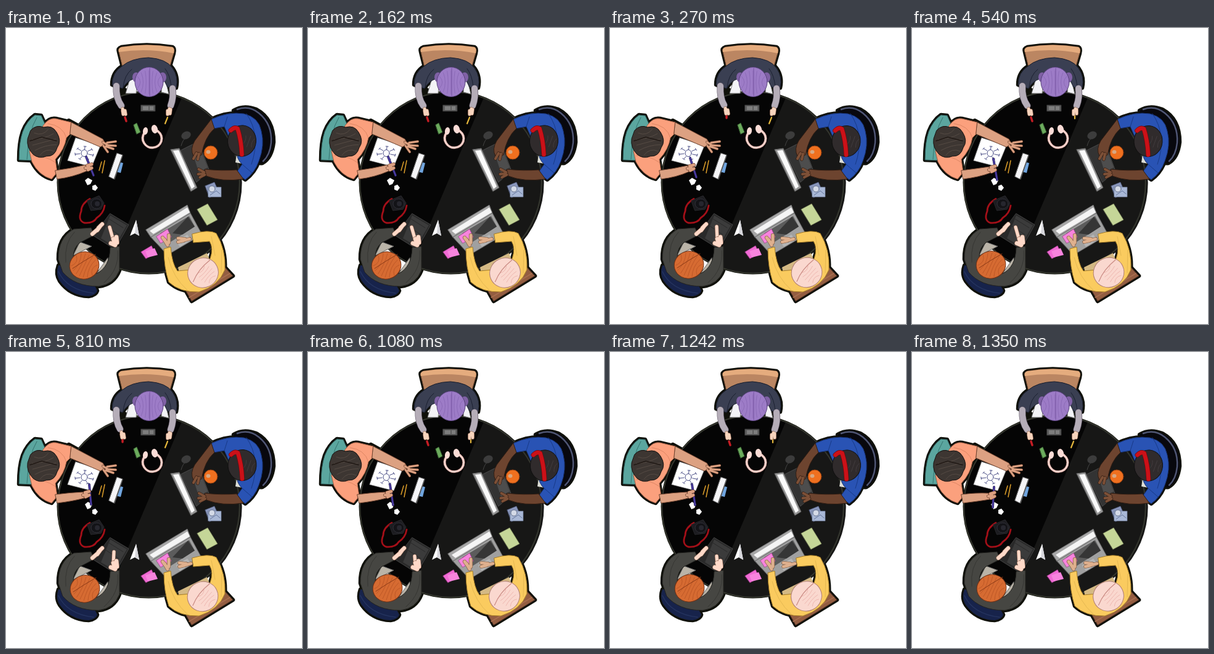
Write an HTML page that moves like this. It is 480 px wide and 480 px high and loops after 1620 ms.

```html
<!DOCTYPE html>
<html lang="en">
<head>
<meta charset="utf-8">
<title>Round table meeting</title>
<style>
html, body { margin: 0; width: 100%; height: 100%; overflow: hidden; background: #fff; }
svg { display: block; width: 100vw; height: 100vh; }
</style>
</head>
<body>
<svg id="stage" viewBox="0 0 480 480" stroke-linecap="round" stroke-linejoin="round"></svg>
<script>
const stage = document.getElementById('stage');
const INK = '#10110a';

const shape = (d, fill, line = 'none', w = 1) =>
  `<path d="${d}" fill="${fill}" stroke="${line}" stroke-width="${w}"/>`;
const line = (d, color, w = 1) => shape(d, 'none', color, w);
const oval = (x, y, rx, ry, fill, turn = 0, edge = 'none') =>
  `<ellipse cx="${x}" cy="${y}" rx="${rx}" ry="${ry}" fill="${fill}" stroke="${edge}" transform="rotate(${turn} ${x} ${y})"/>`;
const limb = (d, color, w, edge) => line(d, edge, w + 1.2) + line(d, color, w);
const moved = ([x, y], content) => `<g transform="translate(${x} ${y})">${content}</g>`;

const chair = {
  top: 'M183 39Q181 33 187 31Q228 24 270 31Q274 33 272 41L265 65L190 67Z',
  left: 'M57 142L47 141Q34 150 27 168Q21 185 21 214L45 215L65 160Z',
  right: 'M369 134Q385 124 406 132Q434 147 434 185Q431 211 416 219Q399 221 395 200Z',
  navy: 'M85 385Q80 399 87 410Q104 434 134 435Q146 433 148 426L140 410L96 385Z',
  wood: 'M292 427L301 443L368 402L354 387Z'
};
const body = {
  top: 'M172 92Q172 72 188 62Q203 49 231 48Q260 50 270 65Q280 79 276 97L262 96L255 82L208 82Q196 86 189 98Z',
  left: 'M61 157Q70 145 81 147L106 153L104 172L98 178Q95 197 80 213L83 234L74 245Q53 239 42 217L38 200Z',
  right: 'M333 148Q360 135 386 139Q410 145 414 167Q420 190 410 216Q404 234 388 246L373 235L383 221Q374 213 374 200L361 176L354 160L337 163Z',
  gray: 'M85 375Q84 340 110 326L138 324L143 336L120 348Q109 356 109 372Q118 405 147 398Q168 388 169 356L184 354L184 393Q175 416 150 419Q111 419 92 396Z',
  yellow: 'M302 334Q329 326 341 333Q357 360 355 392Q345 418 313 428Q282 429 264 412Q256 388 256 358L267 355Q269 382 278 394L300 392L331 374Q337 357 330 346L304 348Z'
};

const outlines = [...Object.values(chair), ...Object.values(body),
  'M176 92L186 130L192 136L204 106Z', 'M273 96L268 128L262 138L252 104Z',
  'M102 150L160 182L128 200Z', 'M337 155L310 188L322 205Z'
].map(d => shape(d, INK, INK, 6.5)).join('');

const table = oval(231.5, 250.5, 149, 149, INK)
  + oval(231.5, 250.5, 147, 147, '#050505')
  + shape('M285 113A147 147 0 1 1 170 383Z', '#171716')
  + `<circle cx="231.5" cy="250.5" r="147.3" fill="none" stroke="#34362e" stroke-width="2"/>`;

function sketch() {
  let marks = '';
  for (let i = 0; i < 7; i++) {
    const a = i * Math.PI / 3.5 + .3, c = Math.cos(a), s = Math.sin(a);
    marks += `M${127 + 7 * c} ${203 + 6 * s}L${127 + 15 * c} ${203 + 11 * s}m${-2 * s} ${2 * c}l${4 * s} ${-4 * c}`;
  }
  return shape('M113 178L153 191L139 225L100 215Z', '#fff', '#888', .7)
    + line(marks, '#4a4e86') + oval(127, 203, 5, 5.5, '#fff', 0, '#4a4e86');
}

const desk =
  // Phone, eraser and headphones
  shape('M219 125H242V135H219Z', '#5d5d5d', '#333') + shape('M222 127H231V133H222ZM233 127H239V133H233Z', '#7e7e7e')
  + shape('M207 157L212 154L218 169L212 172Z', '#6cab5d', '#365d30')
  + limb('M225 169C216 182 227 195 238 194C252 193 258 177 246 167', '#fad4cd', 3, '#9a716c')
  + oval(226, 167, 4, 6, '#fbdcd6', 10) + oval(241, 164, 5, 7, '#fbdcd6', -15)
  // Left side
  + sketch()
  + shape('M182 217L190 219L186 235L178 233Z', '#70a5df')
  + shape('M180 203L189 206L175 245L167 241Z', '#f5f5f7', '#777') + line('M189 207L176 245', '#555', 1.5)
  + line('M155 217L151 231M160 215L156 235', '#e0a12b', 1.5)
  + shape('M128 247L133 243L140 247L137 253L132 255Z', '#fff') + shape('M140 256L145 254L149 259L145 264L140 262Z', '#fff')
  + line('M136 277Q122 285 122 297Q116 312 127 316Q142 317 147 308Q158 301 160 288', '#a40f18', 2.8)
  + shape('M132 280L151 272L159 284L154 294L138 296Z', '#1c1c20', '#2a2a2e') + oval(147, 285, 9, 8, '#131317', 0, '#303038') + oval(148, 285, 4, 4, '#26262e')
  + shape('M169 301L199 319L177 359L142 337Z', '#292929', '#444') + shape('M169 304L196 320L176 354L154 341Z', '#3b3b3b')
  + line('M166 309L190 324M160 320L183 335', '#292929')
  // Bottom
  + shape('M211 311L216 337L209 333L201 337Z', '#fff') + shape('M211 311L216 337L209 333Z', '#d7d7dc')
  + shape('M219 363L236 353L242 366L227 374Z', '#f16ad4', '#a33c8d', .7) + shape('M226 362L241 357L246 368L230 372Z', '#f784dd')
  + shape('M310 294L327 285L343 311L326 320Z', '#c5d698', '#778258', .7)
  + shape('M235 339L299 300L318 335L262 368Z', '#a0a0a0', '#606060') + shape('M250 333L297 305L306 322L262 350Z', '#5c5c5c')
  + shape('M295 306L306 322L286 335L270 333Z', '#363636') + shape('M276 346L294 335L301 344L282 355Z', '#b5b5b5')
  + shape('M227 327L294 287L299 300L235 339Z', '#a6a6a6', '#707070') + shape('M233 329L294 291L298 299L239 334Z', '#f5f5f5')
  + shape('M244 338L262 326L268 339L251 349Z', '#f784dd', '#a33c8d', .7)
  // Right side
  + line('M293 176Q286 182 284 191', '#444') + oval(292, 174, 8, 6, '#3c3c3c', -25)
  + shape('M284 198L312 184L330 232L309 250Z', '#333', '#4a4a4a') + shape('M301 198L314 193L327 226L313 235Z', '#4d4d4d')
  + shape('M267 197L281 195L310 259L300 265Z', '#969696', '#555') + shape('M271 199L280 198L306 257L301 261Z', '#fafafa')
  + oval(332, 202, 11, 11, '#ef701f', 0, '#8a3b10') + oval(328, 201, 3.5, 3, '#d8a781')
  + shape('M323 256L338 250L346 268L330 275Z', '#8996bb', '#4b587c', .7) + shape('M328 258H349V274H328Z', '#a9b8d6', '#65728f', .7)
  + oval(334, 261, 5, 5, '#d4dae7', 0, '#65728f') + line('M331 271L341 264L347 269', '#64749a');

function strands(x, y, r, color, turn, count) {
  let d = '';
  for (let i = 0; i < count; i++) {
    const k = (i + .5) / count * 2 - 1, reach = r * .85 * Math.sqrt(1 - k * k);
    d += `M${k * r} ${-reach}Q${k * r * .5} 0 ${k * r} ${reach}`;
  }
  return `<g transform="translate(${x} ${y}) rotate(${turn})">${line(d, color, .7)}</g>`;
}

const seats =
  shape(chair.top, '#bb8662', '#654029') + shape('M183 39Q181 33 187 31Q228 24 270 31Q274 33 272 41Q228 32 183 39Z', '#e5ac7e')
  + shape(chair.left, '#5ba69f', '#244a49') + line('M50 145Q36 168 34 213', '#35736f')
  + shape(chair.right, '#08080e') + line('M375 132Q394 125 410 138Q432 156 430 186Q428 206 417 216', '#505775', 2.5)
  + shape(chair.navy, '#17234b') + line('M85 395Q99 425 142 430', '#25345f', 1.5)
  + shape(chair.wood, '#935d41', '#4b2c20') + line('M297 437L363 398', '#a96e50', 1.5);

const clothes =
  shape('M201 82L194 106L211 106L214 82ZM253 82L252 104L264 107L258 82Z', '#f3f3f6', '#777')
  + shape(body.top, '#3a3f52', '#171c2b') + line('M190 96Q192 76 204 67M268 95Q266 76 258 66', '#1b2030')
  + shape(body.left, '#fba07d', '#a25e45') + line('M68 155Q92 158 98 178M42 207Q63 206 80 218', '#d67f5d', .8)
  + shape('M376 193L372 218L383 220ZM373 168L362 160L362 175Z', '#dedfd8')
  + shape(body.right, '#2953b4', '#152d69') + line('M354 160L359 144M383 221L399 235M390 139Q414 174 398 221', '#183a87')
  + shape('M120 347L139 354L109 369ZM165 373L168 388L147 398Z', '#bab4a8', '#666')
  + shape(body.gray, '#464642', '#22221f') + line('M111 331Q94 348 97 380M181 361Q184 391 159 413', '#363633')
  + shape('M279 388L326 365L331 378L281 399Z', '#d4b984')
  + shape(body.yellow, '#facb5f', '#a37b27') + line('M333 338L339 369M263 372Q271 405 294 425M350 360L349 397', '#dfb34e', .8);

const heads = {
  purple: oval(211, 80, 6, 8, '#8061a6') + oval(254, 80, 6, 8, '#8061a6') + oval(232, 87.5, 23, 24, '#9d7cc7', 0, '#56407a')
    + strands(232, 88, 22, '#8564b0', 0, 7) + line('M233 65V110', '#7655a2'),
  dark: shape('M40 166Q49 156 61 161Q75 157 82 169Q91 183 83 194Q79 209 65 208Q54 213 44 205Q33 194 35 180Z', '#3d3632', '#15110f')
    + strands(62, 185, 23, '#5d514a', 75, 5) + line('M39 183L58 177L82 183', '#201915', 1.5),
  man: oval(383, 183, 23, 25, '#302b2c', 5, '#101010') + strands(394, 184, 11, '#484143', 20, 3)
    + limb('M365 166Q371 160 376 163Q382 182 383 205', '#cb1118', 6.5, '#6b080d'),
  red: oval(128, 384, 24, 22, '#d66b32', -15, '#713014') + strands(128, 384, 22, '#b75225', 25, 7) + line('M109 389Q125 378 146 366', '#8a3916'),
  pink: oval(319, 396.5, 25, 24, '#fad8cf', -25, '#af7d75') + strands(325, 399, 15, '#e9aca5', 42, 5) + line('M303 411Q311 391 330 376', '#c98982', 1.2)
};

const skin = {
  tan: ['#dca182', '#6d422e'], fair: ['#ffd9c8', '#8d6654'], brown: ['#6d442f', '#301c12'],
  palm: ['#7d5037', '#301c12'], gold: ['#dfb08e', '#785238'], light: ['#f8d4bd', '#8d6654']
};
const arm = (d, tone) => shape(d, ...skin[tone]);
const fingers = (d, tone, w) => limb(d, skin[tone][0], w, skin[tone][1]);

const fixedArms = arm('M106 153L157 180L162 188L153 193Q125 181 104 172Z', 'tan')
  + fingers('M157 185L165 190M164 186L178 184M163 190L178 191M162 192L174 196M158 191L165 201', 'tan', 3)
  + arm('M333 148L338 163Q322 177 317 206L304 208Q298 196 306 183Z', 'brown')
  + fingers('M309 203L304 212M313 204L311 213', 'palm', 4)
  + arm('M374 230L385 245Q350 250 325 240L322 229Q350 232 374 230Z', 'brown')
  + fingers('M262 352L257 343M264 348L264 336M260 348L254 340', 'gold', 5)
  + fingers('M148 327L140 334M150 324L156 318M148 328L153 321', 'fair', 6);

// Pose tracks, one entry per beat
const BEAT = 270;
const tracks = {
  hand: [[135, 226], [132, 227], [131, 229], [131, 231], [131, 231], [130, 233]],
  pen: ['M130 209L142 239', 'M130 211L140 242', 'M132 212L138 246', 'M135 215L138 247', 'M133 215L138 248', 'M133 219L131 252'],
  finger: [[167, 321], [172, 320], [167, 321], [174, 322], [172, 329], [172, 322]],
  marker: [0, 1, 0, 1, 0, 0],
  pencil: [0, 0, 1, 0, 1, 0],
  nod: [-1, 0, 0, 0, 1, 1],
  touch: [0, 0, 0, 2, 2, 2]
};
const beats = tracks.nod.length;

function writer([x, y], pen) {
  return arm(`M80 231Q104 228 ${x - 6} ${y - 4}L${x - 4} ${y + 6}Q108 242 83 245Z`, 'tan')
    + limb(pen, '#4a3ba1', 2.6, '#1d174b')
    + fingers(`M${x - 6} ${y + 1}L${x} ${y}M${x - 3} ${y - 3}L${x + 4} ${y - 5}M${x - 2} ${y + 4}L${x + 4} ${y + 1}`, 'tan', 4.5);
}

function topArms(marker, pencil) {
  const x = 191 - 2 * marker, y = 134 - marker;
  const tip = marker ? 'M189 139L189 146' : 'M193 145L195 151';
  const lead = pencil ? 'M264 141L264 147' : 'M262 145L258 155';
  return limb(`M179 94Q178 114 ${x - 4} ${y - 8}`, '#b5adb8', 10, '#5e5564')
    + limb('M270 98Q272 113 267 126', '#b5adb8', 10, '#5e5564')
    + line(tip, '#c51d24', 3.5) + line(lead, '#e4b73c', 2.2)
    + fingers(`M${x - 2} ${y - 3}L${x} ${y + 1}M${x - 2} ${y}L${x - 1} ${y + 6}M${x + 2} ${y}L${x + 3} ${y + 6}`, 'light', 4.5)
    + fingers(`M265 131L264 135M267 132L${266 + pencil} 139M262 134L262 140`, 'light', 4.5);
}

const pointing = ([x, y]) => fingers(`M174 344L${x + 1} ${y + 2}`, 'fair', 5)
  + fingers('M174 342L177 350M179 339L180 348M170 349L177 352', 'fair', 6.5);

function draw(beat) {
  const pose = Object.fromEntries(Object.entries(tracks).map(([name, list]) => [name, list[beat]]));
  const { nod, touch } = pose;
  moving.innerHTML = topArms(pose.marker, pose.pencil) + writer(pose.hand, pose.pen) + pointing(pose.finger)
    + moved([touch, touch / 2], fingers('M298 342L290 344M290 342L279 341M288 345L279 347', 'gold', 4.5))
    + moved([nod / 2, 0], fingers('M322 234L313 229M321 236L312 237M323 238L315 242', 'palm', 4))
    + heads.purple + heads.dark + moved([nod / 2, nod / 2 + .5], heads.man)
    + moved([nod, -nod], heads.red) + moved([-nod / 2, -nod / 2], heads.pink);
}

stage.innerHTML = outlines + table + seats + desk + clothes + fixedArms + '<g id="moving"></g>';
const moving = document.getElementById('moving');

let shown = -1;
function tick() {
  // The page clock itself drives the loop; 1 ms absorbs clock rounding at a beat's edge.
  const beat = Math.floor((performance.now() + 1) / BEAT) % beats;
  if (beat !== shown) draw(shown = beat);
  requestAnimationFrame(tick);
}
tick();
</script>
</body>
</html>
```
